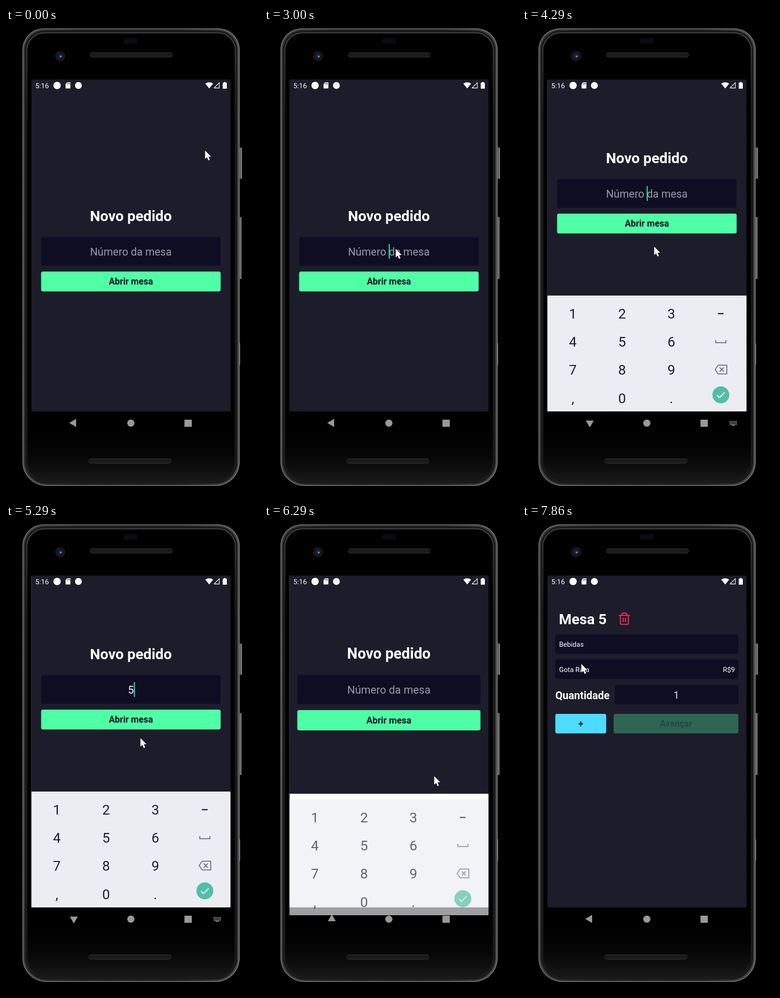
Write an HTML page with a canvas that moves like this. It is 550x1018 px and loops after 8000 ms.

```html
<!DOCTYPE html>
<html lang="pt">
<head>
<meta charset="utf-8">
<title>Novo pedido</title>
<style>
html, body { margin: 0; width: 100%; height: 100%; overflow: hidden; background: #000; }
canvas { display: block; }
</style>
</head>
<body>
<canvas id="stage" width="550" height="1018"></canvas>
<script>
const ctx = document.getElementById('stage').getContext('2d');
const LOOP = 8000, FPS = 7;
const FONT = 'Roboto, sans-serif';
const BG = '#1d1c2b', FIELD = '#0f0d24', GREEN = '#4effa5', INK = '#101026';
const CENTER = 272.5;

// Steps (of 1/7 s) at which the story moves on
const FOCUS = 20, KEYS_UP = 23, TYPED = 37, TAP = 41, LEAVE = 43, TABLE = 45;

const ARROW = new Path2D('M0 0V18.5L4.2 14.7L7.2 21.5L10.3 20.2L7.4 13.5L13 13.2Z');
const BIN = new Path2D('M3 6h18M5 6v14a2 2 0 0 0 2 2h10a2 2 0 0 0 2-2V6' +
  'M8 6V4a2 2 0 0 1 2-2h4a2 2 0 0 1 2 2v2M10 11v6M14 11v6');
const BACKSPACE = new Path2D('M-13 0l6.5-9.5h19v19h-19zM-2.5-4l8 8m0-8l-8 8');

const within = (n, a, b) => n >= a && n <= b;
const clamp = v => Math.min(1, Math.max(0, v));
const easeOut = k => 1 - (1 - k) ** 3;
const smooth = k => k * k * (3 - 2 * k);

function box(x, y, w, h, r, fill) {
  ctx.beginPath();
  ctx.roundRect(x, y, w, h, r);
  ctx.fillStyle = fill;
  ctx.fill();
}

function disc(x, y, r, fill) {
  ctx.beginPath();
  ctx.arc(x, y, r, 0, Math.PI * 2);
  ctx.fillStyle = fill;
  ctx.fill();
}

function trace(points) {
  ctx.beginPath();
  points.forEach(([x, y]) => ctx.lineTo(x, y));
}

function poly(points, fill) {
  trace(points);
  ctx.fillStyle = fill;
  ctx.fill();
}

function line(points, color, width) {
  trace(points);
  ctx.strokeStyle = color;
  ctx.lineWidth = width;
  ctx.stroke();
}

function icon(path, x, y, scale, color, width) {
  ctx.save();
  ctx.translate(x, y);
  ctx.scale(scale, scale);
  ctx.lineJoin = ctx.lineCap = 'round';
  ctx.strokeStyle = color;
  ctx.lineWidth = width;
  ctx.stroke(path);
  ctx.restore();
}

function text(str, x, y, size, { color = '#fff', weight = 400, align = 'center' } = {}) {
  ctx.font = `${weight} ${size}px ${FONT}`;
  ctx.textAlign = align;
  ctx.fillStyle = color;
  ctx.fillText(str, x, y);
}

function button(label, x, y, w, h, size, fill, alpha = 1) {
  ctx.save();
  ctx.globalAlpha = alpha;
  box(x, y, w, h, 4, fill);
  text(label, x + w / 2, y + h / 2 + size * .36, size, { weight: 700, color: INK });
  ctx.restore();
}

function gradient(x0, y0, x1, y1, ...colors) {
  const g = ctx.createLinearGradient(x0, y0, x1, y1);
  colors.forEach((c, i) => g.addColorStop(i / (colors.length - 1), c));
  return g;
}

function grille(x, y) {
  box(x, y, 181, 11, 5.5, '#2c2c2c');
  box(x + 1, y + 1.5, 179, 8, 4, '#171717');
  ctx.setLineDash([1.5, 1.5]);
  for (let dy = 3.5; dy < 9; dy += 2) line([[x + 6, y + dy], [x + 175, y + dy]], '#2b2b2b', 1);
  ctx.setLineDash([]);
}

function sideButton(y, h, w) {
  box(508, y, w, h, 1.5, gradient(508, 0, 508 + w, 0, '#2a2a2a', '#606060', '#8c8c8c'));
}

function shell(inset, fill) {
  const r = 46 - inset * .8;
  box(36 + inset, 1 + inset, 474 - inset * 2, 995 - inset * 2, [r, r, r + 6, r + 6], fill);
}

function phone() {
  box(0, 0, 550, 1018, 0, '#000');
  sideButton(260, 68, 7);
  sideButton(411, 135, 6);
  sideButton(685, 48, 3);

  shell(0, '#757575');
  shell(1.8, gradient(36, 0, 510, 0, '#3c3c3c', '#222', '#222', '#222', '#4a4a4a'));
  shell(5, '#191919');
  shell(8.5, gradient(0, 9, 0, 200, '#4a4a4a', '#1c1c1c'));
  shell(10.5, gradient(0, 880, 0, 986, '#000', '#070707', '#191718'));

  box(257, 22, 31, 12, 4, '#0a0a0f');
  grille(183, 53);
  grille(180, 936.5);
  disc(118, 61, 10.5, '#1d1d25');
  disc(118, 61, 8, '#12141f');
  disc(118.5, 61, 4.5, '#1f2d50');
  disc(119.5, 62, 1.7, '#7ea2d8');
}

function statusBar() {
  text('5:16', 64, 130.5, 15.3, { align: 'left' });
  disc(111.5, 125, 8, '#fff');
  poly([[130, 122], [133.5, 118], [140.5, 118], [140.5, 131.5], [130, 131.5]], '#fff');
  for (let x = 133.5; x < 139; x += 2.2) box(x, 119.5, 1.1, 3, 0, BG);
  disc(158, 125, 7.5, '#fff');
  ctx.beginPath();
  ctx.moveTo(443.5, 131.5);
  ctx.arc(443.5, 131.5, 13.5, -Math.PI * .72, -Math.PI * .28);
  ctx.fillStyle = '#fff';
  ctx.fill();
  line([[454, 130.5], [465.5, 130.5], [465.5, 119], [454, 130.5]], '#fff', 1.3);
  box(473, 119, 9, 13, 1, '#fff');
  box(475.5, 117.5, 4, 3, 0, '#fff');
}

// Lit for three steps, dark for three, restarted by focus and by typing
function caretOn(n) {
  if (!within(n, FOCUS, TAP - 2)) return false;
  return n < 26 || n >= 36 || within(n, 30, 32);
}

function orderScreen(n, dy) {
  const typed = within(n, TYPED, LEAVE - 1);
  text('Novo pedido', CENTER, 420 + dy, 31.7, { weight: 700 });
  box(76.7, 454.7 + dy, 391.6, 62.6, 4, FIELD);
  text(typed ? '5' : 'Número da mesa', CENTER, 495 + dy, 23.3, { color: typed ? '#f2f2f4' : '#9b9aa2' });
  if (caretOn(n)) box(typed ? 279 : 272, 470 + dy, 2.5, 32, 0, '#2ed1a8');
  const press = Math.min(1, .21 + .4 * Math.abs(n - TAP));
  button('Abrir mesa', 76.6, 529.7 + dy, 391.9, 43.2, 19.5, GREEN, press);
}

function tableScreen(loaded) {
  text('Mesa 5', 80.5, 218, 31.7, { weight: 700, align: 'left' });
  icon(BIN, 208.7, 191.3, 1.23, '#ec2a50', 2);
  if (loaded) {
    box(72.7, 240, 399.6, 42.4, 4, FIELD);
    text('Bebidas', 81, 267, 15, { align: 'left' });
    box(72.7, 294.6, 399.6, 42.4, 4, FIELD);
    text('Gota Rara', 81, 322, 15, { align: 'left' });
    text('R$9', 464.5, 322, 15, { align: 'right' });
  }
  ctx.translate(0, loaded ? 0 : -110);
  text('Quantidade', 72.7, 380.5, 23, { weight: 700, align: 'left' });
  box(202.7, 350, 269.6, 42.4, 4, FIELD);
  text('1', 337, 380, 22, { color: '#e8e8ec' });
  button('+', 72.7, 413, 111, 42.4, 20, '#4bdcff');
  button('Avançar', 200, 413, 272.3, 42.4, 19.5, GREEN, .32);
}

function keyboard(offset, alpha) {
  const ink = '#14232a', grey = '#66737a';
  ctx.save();
  ctx.translate(0, offset);
  ctx.globalAlpha = alpha;
  box(55.5, 582, 434.5, 252, 0, '#ebedf2');
  ['123', '456', '789', ',0.'].forEach((row, r) =>
    [...row].forEach((key, c) => text(key, 111 + c * 107.5, 632 + r * 61.2, 30, { color: ink })));
  box(427.5, 620, 12.5, 2.6, 0, ink);
  line([[423, 679], [423, 684.5], [445, 684.5], [445, 679]], grey, 2.2);
  icon(BACKSPACE, 434.5, 743, 1, grey, 2);
  disc(434, 798, 18.5, '#52bea8');
  line([[425.5, 798.5], [431, 804], [442.5, 792.5]], '#fff', 2.2);
  ctx.restore();
}

function navBar(angle, keysIcon) {
  const tone = 'rgba(255,255,255,.6)';
  const corner = a => {
    const t = (a - angle) * Math.PI / 180;
    return [148 + 10 * Math.cos(t), 859 + 10 * Math.sin(t)];
  };
  poly([180, 60, 300].map(corner), tone);
  disc(CENTER, 859.5, 7.8, tone);
  box(389.5, 852, 16, 15.5, 0, tone);
  if (!keysIcon) return;
  for (let i = 0; i < 18; i++) box(453 + (i % 6) * 2.8, 855 + Math.floor(i / 6) * 3, 1.9, 1.9, 0, tone);
  box(457, 863.3, 8, 1.8, 0, tone);
}

function pointer(n) {
  let x = 434, y = 266;
  const glide = (from, to, tx, ty, ease) => {
    const k = ease(clamp((n - from) / (to - from)));
    x += (tx - x) * k;
    y += (ty - y) * k;
  };
  glide(0, 5, 388, 431, smooth);
  glide(10, 18, 287, 480, easeOut);
  glide(26, 28, 288, 475, smooth);
  glide(35, TAP, 307, 437, smooth);
  glide(TAP, 44, 371, 548, smooth);
  glide(47, 52, 131, 295, smooth);
  glide(54, 55, 129, 304, smooth);

  ctx.save();
  ctx.translate(x + .5, y + .5);
  ctx.lineWidth = 1.4;
  ctx.strokeStyle = '#15151c';
  ctx.stroke(ARROW);
  ctx.fillStyle = '#fff';
  ctx.fill(ARROW);
  ctx.restore();
}

// Offset, opacity and back arrow angle while the keyboard slides in or out
function slide(n) {
  if (!within(n, KEYS_UP, TABLE)) return { open: false, offset: 0, alpha: 0, angle: 0 };
  const closing = Math.max(0, n - LEAVE);
  const rest = .1 ** (n - KEYS_UP);
  return closing
    ? { open: true, offset: 17 * closing, alpha: 1 - .33 * closing, angle: 60 - 30 * closing }
    : { open: true, offset: 48 * rest, alpha: 1 - .39 * rest, angle: 90 - 45 * rest };
}

function scene(n) {
  const keys = slide(n);
  const zoom = n === TABLE ? .97 : n === TABLE - 1 ? 1.02 : 1;
  const bottom = keys.open ? 582 : 834;
  const midY = (112 + bottom) / 2;

  phone();
  ctx.save();
  ctx.beginPath();
  ctx.rect(55.5, 112, 434.5, 722);
  ctx.clip();
  box(55.5, 112, 434.5, 722, 0, keys.open ? '#fff' : BG);
  const edge = midY + (bottom - midY) * Math.max(1, zoom);
  box(55.5, 112, 434.5, edge - 112, 0, BG);
  ctx.translate(CENTER, midY);
  ctx.scale(zoom, zoom);
  ctx.translate(-CENTER, -midY);
  if (n < TABLE) orderScreen(n, keys.open ? -126 : 0);
  else tableScreen(n > TABLE);
  ctx.restore();

  statusBar();
  if (keys.open) keyboard(keys.offset, keys.alpha);
  navBar(keys.angle, within(n, KEYS_UP, LEAVE));
  pointer(n);
}

function tick(now) {
  // A small lead keeps each step on its rounded start time.
  scene(Math.floor(((now + 5) % LOOP) * FPS / 1000));
  requestAnimationFrame(tick);
}
requestAnimationFrame(tick);
</script>
</body>
</html>
```
